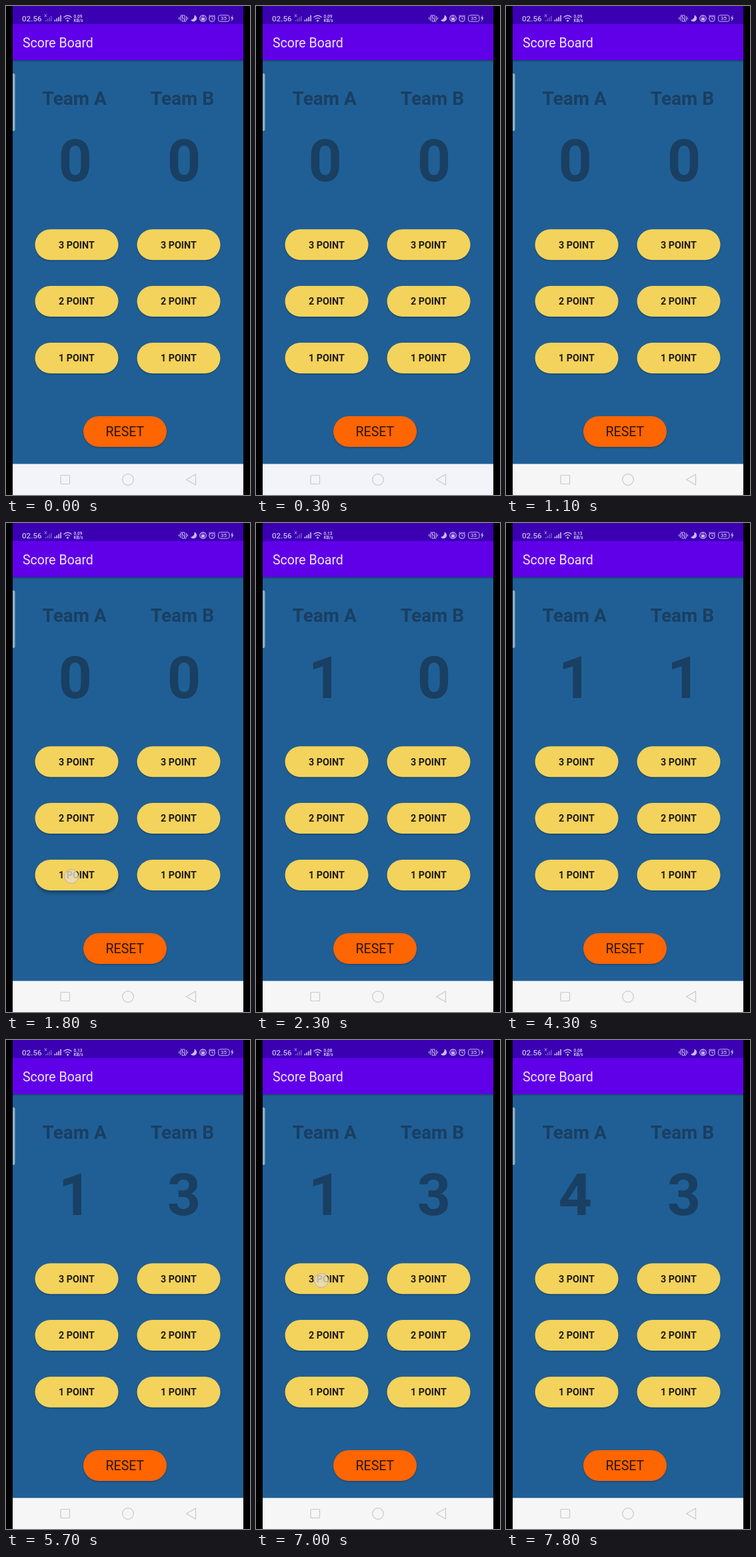
Write an HTML page that moves like this. It is 366 px wide and 732 px high and loops after 8 s.

```html
<!DOCTYPE html>
<html lang="en">
<head>
<meta charset="utf-8">
<title>Score Board</title>
<style>
html, body { margin: 0; width: 100%; height: 100%; overflow: hidden; background: #000; }
svg { display: block; width: 366px; height: 732px; font-family: Roboto, sans-serif; }
.team, .score { font-weight: 700; fill: #193f62; text-anchor: middle; }
.team { font-size: 28px; }
.score { font-size: 88px; }
.label { font-size: 14.3px; font-weight: 700; fill: #211b12; text-anchor: middle; }
.line { fill: none; stroke: #cbb8f0; stroke-width: 1.2; }
.solid { fill: #cbb8f0; }
.tiny { font-size: 6.5px; font-weight: 700; }
.nav { fill: none; stroke: #c9c9cc; stroke-width: 1.2; stroke-linejoin: round; }
</style>
</head>
<body>
<svg viewBox="0 0 366 732">
  <defs>
    <linearGradient id="shade" x2="0" y2="1">
      <stop stop-color="#0d2b50" stop-opacity=".6"/>
      <stop offset="1" stop-color="#0d2b50" stop-opacity="0"/>
    </linearGradient>
  </defs>
  <path d="M10 0H356V732H10z" fill="#205f95"/>
  <path d="M10 0H356V27H10z" fill="#3a00b2"/>
  <path d="M10 27H356V81H10z" fill="#5f00e8"/>
  <path d="M10 81H356V84H10z" fill="url(#shade)"/>
  <path id="navBar" d="M10 685.5H356V732H10z"/>
  <path d="M10 101h1.5q2 0 2 2v82q0 2-2 2H10z" fill="#8eafc6"/>

  <!-- status bar -->
  <text x="24" y="22.5" font-size="11.6" font-weight="500" class="solid">02.56</text>
  <g class="solid">
    <path d="M59 23v-2h1.5v2zm2.7 0v-4h1.5v4zm2.7 0v-6h1.5v6zm2.7 0v-8h1.5v8z" opacity=".45"/>
    <path d="M72.5 23v-2.5h1.7v2.5zm2.9 0v-4.5h1.7v4.5zm2.9 0v-6.5h1.7v6.5zm2.9 0v-9h1.7v9z"/>
    <circle cx="92.5" cy="22" r="1.5"/>
    <text id="rate" x="101.5" y="18" class="tiny"></text>
    <text x="101.5" y="24" class="tiny" font-size="6">KB/s</text>
    <path d="M282.5 13.5a5 5 0 1 1-5.5 7.5 6 6 0 0 0 5.5-7.5z"/>
    <path d="M293 17.5h5v4h-5zM340 13.5l-3 5h2l-1 5 3.5-6h-2z"/>
    <text x="326.5" y="21.3" text-anchor="middle" font-size="8" font-weight="500">35</text>
  </g>
  <g class="line">
    <path d="M58 12.5l3 4m0-4l-3 4" stroke-width=".9"/>
    <path d="M86.5 17q6-5.5 12 0M88.8 19.5q3.7-3.2 7.4 0"/>
    <path d="M264 14h4v9h-4zM261.5 15v7M270.5 15v7M259.5 17v3M272.5 17v3M262 13l8 11" stroke-width="1"/>
    <circle cx="295.5" cy="18.5" r="4.7"/>
    <path d="M294 17.5v-1a1.5 1.5 0 0 1 3 0v1" stroke-width=".9"/>
    <circle cx="309" cy="19" r="4.2"/>
    <path d="M309 16.5v2.8h2M304 15.5l2.5-2M314 15.5l-2.5-2" stroke-width="1"/>
    <rect x="318.5" y="13.8" width="16.5" height="9.4" rx="2.8" stroke-width="1"/>
  </g>

  <text x="25" y="62" font-size="19.5" fill="#f0e8ff">Score Board</text>
  <text x="102.7" y="148" class="team">Team A</text>
  <text x="264.5" y="148" class="team">Team B</text>
  <text id="scoreA" x="103.7" y="262" class="score"></text>
  <text id="scoreB" x="267" y="262" class="score"></text>

  <g id="buttons"></g>

  <g class="nav">
    <rect x="82" y="702.5" width="13.5" height="13" rx="1"/>
    <circle cx="183" cy="709" r="8.3"/>
    <path d="M270.5 709L284.500 701V717z"/>
  </g>
  <circle id="touch" r="10.5" fill="#e6dcc4" fill-opacity=".8" stroke="#b3a588" stroke-opacity=".75"/>
</svg>
<script>
const LOOP = 8000;
const $ = id => document.getElementById(id);

// Each tap presses one button and scores when the finger lifts.
const taps = [
  { team: 'A', points: 1, x: 98, y: 529, down: 1600, up: 1900 },
  { team: 'B', points: 1, x: 249, y: 529, down: 3400, up: 3700 },
  { team: 'B', points: 2, x: 250, y: 444, down: 5000, up: 5200 },
  { team: 'A', points: 3, x: 98, y: 360, down: 7000, up: 7300 }
];

function button(id, x, y, fill, text, attrs) {
  const box = f => `<rect x="${x}" y="${y}" width="125" height="46" rx="23" ${f}/>`;
  return box(`id="shadow${id}" fill="#0c2a49"`) + box(`fill="${fill}"`) +
    `<text x="${x + 62.4}" ${attrs}>${text}</text>`;
}

let markup = button('R', 116, 614, '#ff6500', 'RESET',
  'y="644.3" font-size="19.6" fill="#2b1607" text-anchor="middle"');
for (const [team, x] of [['A', 43.5], ['B', 196.5]])
  for (const points of [1, 2, 3]) {
    const y = 588.7 - 84.8 * points;
    markup += button(team + points, x, y, '#f3d35b', points + ' POINT',
      `y="${y + 28.3}" class="label"`);
  }
$('buttons').innerHTML = markup;

const clamp = v => Math.max(0, Math.min(1, v));

function lift(id, amount) {
  const shadow = $('shadow' + id);
  shadow.setAttribute('transform', `translate(0 ${1.3 + 2.7 * amount})`);
  shadow.style.filter = `blur(${1 + amount}px)`;
  shadow.style.opacity = .5;
}
for (const id of ['R', 'A1', 'A2', 'A3', 'B1', 'B2', 'B3']) lift(id, 0);

function draw(now) {
  const t = now % LOOP;
  const score = { A: 0, B: 0 };
  let finger = null;
  for (const tap of taps) {
    if (t >= tap.up) score[tap.team] += tap.points;
    else if (t >= tap.down) finger = tap;
    lift(tap.team + tap.points,
      clamp((t - tap.down) / 100) * clamp(1 - (t - tap.up) / 100));
  }
  $('scoreA').textContent = score.A;
  $('scoreB').textContent = score.B;
  $('rate').textContent = t < 1900 ? '0.09' : t < 5800 ? '0.13' : '0.08';
  $('navBar').setAttribute('fill', t < 1000 ? '#f2f4f9' : '#f6f6f6');
  $('touch').style.display = finger ? '' : 'none';
  if (finger) $('touch').setAttribute('transform', `translate(${finger.x} ${finger.y})`);
}

const start = performance.now();
(function tick() {
  draw(performance.now() - start);
  requestAnimationFrame(tick);
})();
</script>
</body>
</html>
```
